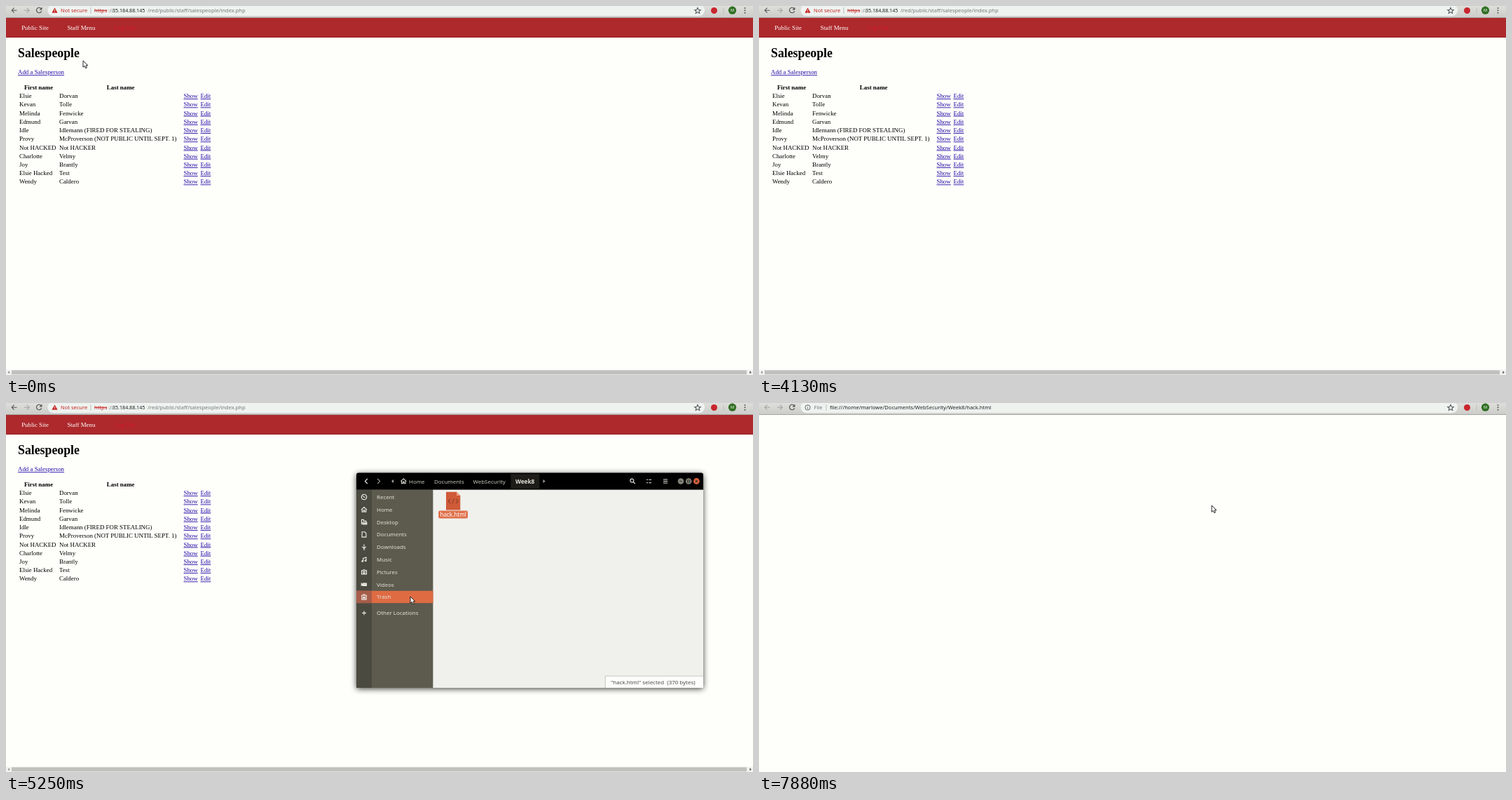
An HTML page that plays this animation: 1066 by 526 pixels, repeating every 8000 ms.

```html
<!DOCTYPE html>
<html lang="en">
<head>
<meta charset="utf-8">
<title>Salespeople</title>
<style>
html, body { margin: 0; width: 100%; height: 100%; overflow: hidden; background: #fefefb; }
svg { display: block; width: 100vw; height: 100vh; }
text { white-space: pre; }
.serif { font: 8.88px "Liberation Serif", serif; }
.ui { font: 7.5px "Noto Sans", "Open Sans", sans-serif; }
.files { font: 7.95px "Noto Sans", "Open Sans", sans-serif; }
.b { font-weight: bold; }
.mid { text-anchor: middle; }
.link { fill: #2408a6; text-decoration: underline; }
.line { fill: none; stroke: currentColor; stroke-width: 1.1; }
#win { --bar1: #5a594e; --bar2: #43423a; --strip: #4b4a41; --side: #5c5b4e; --fg: #e3e0d8;
  --path: #c9c6bc; --tag: #e0704a; --tagText: #fff; --close: #e0603a; --knob: #85847a;
  --status: #fdfdfc; --edge: #c9c9c4; --info: #4c4c4c; --tab: #35342e; --shade: .75; }
#win.back { --bar1: #403f38; --bar2: #3d3c35; --strip: #4d4d45; --side: #3c3b34; --fg: #dedcd4;
  --path: #a3a198; --tag: #dcdcd8; --tagText: #3c3c3c; --close: #5d5c54; --knob: #5d5c54;
  --status: #f0f0ec; --edge: #666661; --info: #73736e; --tab: #34332d; --shade: .3; }
</style>
</head>
<body>
<svg id="stage" viewBox="0 0 1066 526" preserveAspectRatio="none"></svg>
<script>
const LOOP = 8000, TICK = 125;
const PAGE = "#fefefb";

const rect = (x, y, w, h, fill, extra = "") =>
  `<rect x="${x}" y="${y}" width="${w}" height="${h}" fill="${fill}" ${extra}/>`;
const circle = (x, y, r, fill, extra = "") =>
  `<circle cx="${x}" cy="${y}" r="${r}" fill="${fill}" ${extra}/>`;
const text = (x, y, str, cls, extra = "") =>
  `<text x="${x}" y="${y}" class="${cls}" ${extra}>${str}</text>`;
const line = (d, color, extra = "") =>
  `<path class="line" d="${d}" style="color:${color}" ${extra}/>`;
const shape = (d, fill, extra = "") => `<path d="${d}" fill="${fill}" ${extra}/>`;
const group = (id, body, extra = "") => `<g id="${id}" ${extra}>${body}</g>`;

// Browser toolbar
const arrowBack = "M15.5 6.2H8.3M11.7 2.7L8.2 6.2L11.7 9.7";

function toolbar() {
  return rect(0, 0, 1066, 17, "url(#chrome)") + rect(0, 16, 1066, 1, "#a6a6a3") +
    rect(59.5, -2, 937.5, 16.3, "#eef3f0", 'rx="8"') +
    line(arrowBack, "#55585b", 'id="backArrow"') +
    line(arrowBack, "#a3a5a6", 'transform="translate(41.5 0) scale(-1 1)"') +
    line("M50.4 4.1A3.7 3.7 0 1 0 50.7 7.2M50.9 2V4.9H48", "#4c4f52", 'id="reload"') +
    line("M44 3L50 9M50 3L44 9", "#4c4f52", 'id="stop"') +
    line("M987 2.4L988.3 5.2L991.3 5.5L989 7.5L989.7 10.4L987 8.8L984.3 10.4L985 7.5L982.7 5.5L985.7 5.2Z",
      "#55585b", 'style="stroke-width:.8"') +
    circle(1010.5, 6.5, 4.5, "#c9252d") + rect(1023.6, 2, .7, 9, "#b4b4b2") +
    circle(1036.5, 6.2, 5.6, "#2f6f22") +
    text(1036.5, 8.2, "M", "ui mid", 'fill="#fff" style="font-size:5.6px"') +
    [2.9, 6.3, 9.7].map(y => circle(1054.5, y, .95, "#4c4f52")).join("");
}

function siteAddress() {
  return shape("M69.5 2.6L73.6 9.8H65.4Z", "#c5221f") + rect(69.1, 5, .8, 2.4, "#fff") + rect(69.1, 8, .8, .8, "#fff") +
    text(78, 9.2, "Not secure", "ui", 'fill="#c5221f"') + rect(120.6, 2, .7, 9, "#a9adab") +
    text(126, 9.2, "https", "ui", 'fill="#c5221f" text-decoration="line-through"') +
    text(146, 9.2, "://", "ui", 'fill="#75797b"') +
    text(152, 9.2, "35.184.88.145", "ui", 'fill="#222" style="font-size:7.1px"') +
    text(202, 9.2, "/red/public/staff/salespeople/index.php", "ui", 'fill="#75797b"');
}

function fileAddress() {
  return circle(69.5, 6.4, 3.6, "none", 'stroke="#55585b" stroke-width=".9"') +
    rect(69.1, 5.9, .8, 2.6, "#55585b") + rect(69.1, 4.2, .8, .8, "#55585b") +
    text(78.5, 9.2, "File", "ui", 'fill="#75797b"') + rect(95.6, 2, .7, 9, "#a9adab") +
    text(101, 9.2, "file:///home/marlowe/Documents/WebSecurity/Week8/hack.html", "ui",
      'fill="#222" style="font-size:7.56px"');
}

// Staff page
const people = [
  ["Elsie", "Dorvan"], ["Kevan", "Tolle"], ["Melinda", "Fenwicke"], ["Edmund", "Garvan"],
  ["Idle", "Idlemann (FIRED FOR STEALING)"], ["Provy", "McProverson (NOT PUBLIC UNTIL SEPT. 1)"],
  ["Not HACKED", "Not HACKER"], ["Charlotte", "Velmy"], ["Joy", "Brantly"],
  ["Elsie Hacked", "Test"], ["Wendy", "Caldero"]
];

function page() {
  const rows = people.map(([first, last], i) => {
    const y = 131.2 + i * 12.22;
    return text(19, y, first, "serif") + text(76, y, last, "serif") +
      text(253.5, y, "Show", "serif link") + text(277.5, y, "Edit", "serif link");
  }).join("");
  return rect(0, 17, 1066, 28, "#ad292c") + rect(0, 44.3, 1066, .7, "#8f2225") +
    text(22.2, 34.4, "Public Site", "serif", 'fill="#fff"') +
    text(87.4, 34.4, "Staff Menu", "serif", 'fill="#fff"') +
    text(154.5, 34.4, "Log Out", "serif", 'fill="#d8132c"') +
    text(17, 73, "Salespeople", "serif b", 'style="font-size:17.77px"') +
    text(17, 97.3, "Add a Salesperson", "serif link") +
    text(46.5, 119, "First name", "serif b mid") + text(163.7, 119, "Last name", "serif b mid") + rows +
    group("pick", rect(18.8, 123.3, 18.6, 10.2, "#3d83d9") + text(19, 131.2, people[0][0], "serif", 'fill="#fff"')) +
    rect(0, 518.5, 1066, 7.5, "#f1f1ef") + rect(8, 519.3, 1049, 6, "#c0c0be") +
    shape("M5 520.3V524.3L2.6 522.3Z", "#8a8a88") + shape("M1061.4 520.3V524.3L1063.8 522.3Z", "#484848");
}

// File manager
const places = [
  ["Recent", "M-3.7 0A3.7 3.7 0 1 1 3.7 0A3.7 3.7 0 1 1 -3.7 0M-1.8 -1.6L0 .3H1.6"],
  ["Home", "M-4 .3L0 -3.4L4 .3M-2.8 0V3.4H-.8V1H.8V3.4H2.8V0"],
  ["Desktop", "M-3.6 3.4V-3.3H-.6V-1.6H2.6V.1M-2 3.2V.4H3.8V3.2ZM-2 1.8H3.8"],
  ["Documents", "M-2.9 -3.7H.9L2.9 -1.7V3.7H-2.9Z"],
  ["Downloads", "M0 -3.7V2.2M-2.8 -.5L0 2.3L2.8 -.5M-1.2 3.7H1.2"],
  ["Music", "M-1.4 2.2V-1.6L3 -3V1.4M-3.2 2.4A.9 .9 0 1 0 -1.4 2.4A.9 .9 0 1 0 -3.2 2.4M1.2 1.6A.9 .9 0 1 0 3 1.6A.9 .9 0 1 0 1.2 1.6"],
  ["Pictures", "M-3.5 -2H-1.4L-.8 -3H.8L1.4 -2H3.5V3H-3.5ZM-1.3 .5A1.3 1.3 0 1 0 1.3 .5A1.3 1.3 0 1 0 -1.3 .5"],
  ["Videos", "M-1.6 -1.7H3.4V1.8H-1.6ZM-1.6 -.7H3.4M-1.6 .6H3.4M-3.7 -1.6L-2 0L-3.7 1.6Z"],
  ["Trash", "M-4 -2.3H4M-1.8 -3.5H1.8M-3.2 -2V3.6H3.2V-2M-1.3 -.6V2.4M0 -.6V2.4M1.3 -.6V2.4"],
  ["Other Locations", "M-2.8 0H2.8M0 -2.8V2.8"]
];
const PITCH = 17.82;
const placeY = i => 134 + i * PITCH + (i === 9 ? 5 : 0);
const at = (x, y) => `transform="translate(${x} ${y})"`;

function fileWindow() {
  const side = places.map(([name, icon], i) =>
    line(icon, "#f0eee8", at(511, placeY(i))) +
    text(529, placeY(i) + 2.9, name, "files", 'fill="var(--fg)"')).join("");
  const crumb = (x, str) => text(x, 114.7, str, "files", 'fill="var(--path)"');
  const dividers = [523, 541, 558.5, 604.5, 659.5, 884, 906, 929]
    .map(x => rect(x, 101, .6, 21.5, "#000", 'opacity=".22"')).join("");
  const knobs = circle(963, 111.5, 4.3, "var(--knob)") + circle(974.2, 111.5, 4.3, "var(--knob)") +
    circle(985.4, 111.5, 4.4, "var(--close)") +
    line("M961.2 111.5H964.8M972.6 110H975.8V113H972.6ZM983.9 110L986.9 113M986.9 110L983.9 113", "#35342e",
      'style="stroke-width:.8"');
  return rect(500, 99.5, 495, 306.5, "#000", 'rx="3" filter="url(#soft)" style="opacity:var(--shade)"') +
    shape("M500 124V102.5Q500 99.5 503 99.5H992Q995 99.5 995 102.5V124Z", "url(#bar)") +
    rect(500, 123.3, 22, 282.7, "var(--strip)") + rect(522, 123.3, 87.5, 282.7, "var(--side)") +
    rect(609.5, 123.3, 385.5, 282.7, "#f0f0ec") + rect(609.3, 123.3, .6, 282.7, "#c9c8c2") +
    rect(500, 122.9, 495, .7, "#2f2e29") + dividers +
    line("M515.8 108L512.4 111.5L515.8 115", "#eceae3") +
    line("M530.2 108L533.6 111.5L530.2 115", "#99978d") +
    shape("M553 109V114L550 111.5Z", "#a9a79d") + shape("M766.5 109V114L769.5 111.5Z", "#a9a79d") +
    line(places[1][1], "var(--fg)", at(567.3, 111.3)) + crumb(575, "Home") + crumb(611, "Documents") + crumb(666.5, "WebSecurity") +
    rect(720.5, 101.5, 40.5, 20.5, "var(--tab)", 'opacity=".55" stroke="#2c2b26" stroke-width=".7"') +
    text(727, 114.7, "Week8", "files b", 'fill="var(--fg)" style="font-size:8.2px"') +
    line("M890.8 110.6A2.5 2.5 0 1 0 895.8 110.6A2.5 2.5 0 1 0 890.8 110.6M895.2 112.5L897.8 115.1", "#eceae3", 'style="stroke-width:1.3"') +
    line("M914 109.3H916M917.3 109.3H921M914 113.7H916M917.3 113.7H921", "#eceae3", 'style="stroke-width:1.6"') +
    line("M938 109H944M938 111.5H944M938 114H944", "#eceae3") + knobs +
    group("hover", rect(500, 125.2, 109.5, 17.4, "#df6b43") + rect(500, 125.2, 22, 17.4, "#a75d49")) + side +
    shape("M628 126.8H643L648.3 132V152.5H628Z", "#cf5a38", 'id="doc"') +
    shape("M643 126.8V132H648.3Z", "#f0a183") +
    line("M634 137L631 140L634 143M642.2 137L645.2 140L642.2 143", "#8f4029", 'id="angles"') +
    line("M639.3 136.3L636.9 143.7", "#8f4029") +
    rect(617.2, 153.6, 41.8, 10.8, "var(--tag)", 'rx="2"') +
    text(638.2, 161.6, "hack.html", "files mid", 'fill="var(--tagText)" style="font-size:8.1px"') +
    rect(855, 389, 140, 17, "var(--status)") +
    line("M855.3 406V389.3H995", "var(--edge)", 'style="stroke-width:.8"') +
    text(863, 400.6, "\"hack.html\" selected\u00a0 (370 bytes)", "files", 'fill="var(--info)"');
}

const stage = document.getElementById("stage");
stage.innerHTML = `<defs>
  <linearGradient id="chrome" x2="0" y2="1"><stop stop-color="#dededb"/><stop offset="1" stop-color="#cbcbc8"/></linearGradient>
  <linearGradient id="bar" x2="0" y2="1"><stop style="stop-color:var(--bar1)"/><stop offset="1" style="stop-color:var(--bar2)"/></linearGradient>
  <filter id="soft" x="-5%" y="-8%" width="110%" height="116%"><feOffset dy="1.5"/><feGaussianBlur stdDeviation="4"/></filter>
  </defs>` +
  rect(0, 0, 1066, 526, PAGE) + group("page", page()) + toolbar() +
  group("siteUrl", siteAddress()) + group("fileUrl", fileAddress()) +
  group("win", fileWindow()) +
  group("tip", rect(39, 509, 30.8, 14, "#6a6b69", 'rx="3"') + text(54.2, 518.9, "Files", "files mid", 'fill="#f0f0ee"')) +
  group("arrow", shape("M0 0V9.3L2.2 7.4L3.7 10.7L5.4 10L4 6.8H6.9Z", "#fff",
    'stroke="#111" stroke-width=".9" stroke-linejoin="round"')) +
  group("beam", line("M-2 -5Q0 -5 0 -3.8Q0 -5 2 -5M0 -4V4M-2 5Q0 5 0 3.8Q0 5 2 5", "#333"));

const el = {};
for (const node of stage.querySelectorAll("[id]")) el[node.id] = node;
const show = (node, on) => node.setAttribute("visibility", on ? "visible" : "hidden");

// Pointer tracks: [time, x, y] stops, each track visible until its end
const tracks = [
  { end: 4125, stops: [[0, 110, 78], [125, 110, 78], [625, 43, 22], [875, 45, 9], [1250, 45, 9], [1625, 66, 58],
    [2000, 36, 137], [2125, 30, 130], [2625, 30, 130], [2875, 51.5, 126.5], [3500, 51.5, 126.5], [4000, 141, 480]] },
  { end: 6750, stops: [[4750, 110, 514], [5000, 400, 400], [5250, 577, 276], [5375, 597, 249],
    [5875, 636, 168], [6250, 646, 146], [6375, 646, 146], [6500, 649, 151], [6625, 646, 147]] },
  { end: LOOP, stops: [[7875, 646, 146]] }
];

function pointer(t) {
  const track = tracks.find(k => t >= k.stops[0][0] && t < k.end);
  if (!track) return null;
  const next = track.stops.findIndex(s => s[0] > t);
  if (next < 0) return track.stops.at(-1).slice(1);
  const [t0, x0, y0] = track.stops[next - 1], [t1, x1, y1] = track.stops[next];
  const k = (t - t0) / (t1 - t0);
  return [x0 + (x1 - x0) * k, y0 + (y1 - y0) * k];
}

function draw(time) {
  const t = Math.floor(time / TICK) * TICK;
  const within = (a, b) => t >= a && t < b;
  const blank = t >= 7125, open = within(4625, 7125);
  const pos = pointer(t), beam = within(2000, 2750);

  el.page.style.display = blank ? "none" : "";
  el.win.style.display = open ? "" : "none";
  el.win.setAttribute("class", t < 4750 ? "back" : "");
  show(el.siteUrl, !blank);
  show(el.fileUrl, blank);
  el.backArrow.style.color = blank ? "#a3a5a6" : "#55585b";
  show(el.stop, within(1375, 1625));
  show(el.reload, !within(1375, 1625));
  show(el.pick, within(2250, 3375));
  show(el.tip, within(4625, 4750));

  show(el.arrow, pos && !beam);
  show(el.beam, pos && beam);
  if (pos) (beam ? el.beam : el.arrow).setAttribute("transform", `translate(${pos})`);

  const row = pos && open && pos[0] > 500 && pos[0] < 609 ? Math.floor((pos[1] - 125.1) / PITCH) : -1;
  show(el.hover, row >= 0 && row < 9);
  el.hover.setAttribute("transform", `translate(0 ${row * PITCH})`);
  const lit = within(6000, 7125);
  el.doc.setAttribute("fill", lit ? "#e56a43" : "#cf5a38");
  el.angles.style.display = lit ? "none" : "";
}

const start = performance.now();
function tick() {
  draw((performance.now() - start) % LOOP);
  requestAnimationFrame(tick);
}
tick();
</script>
</body>
</html>
```
